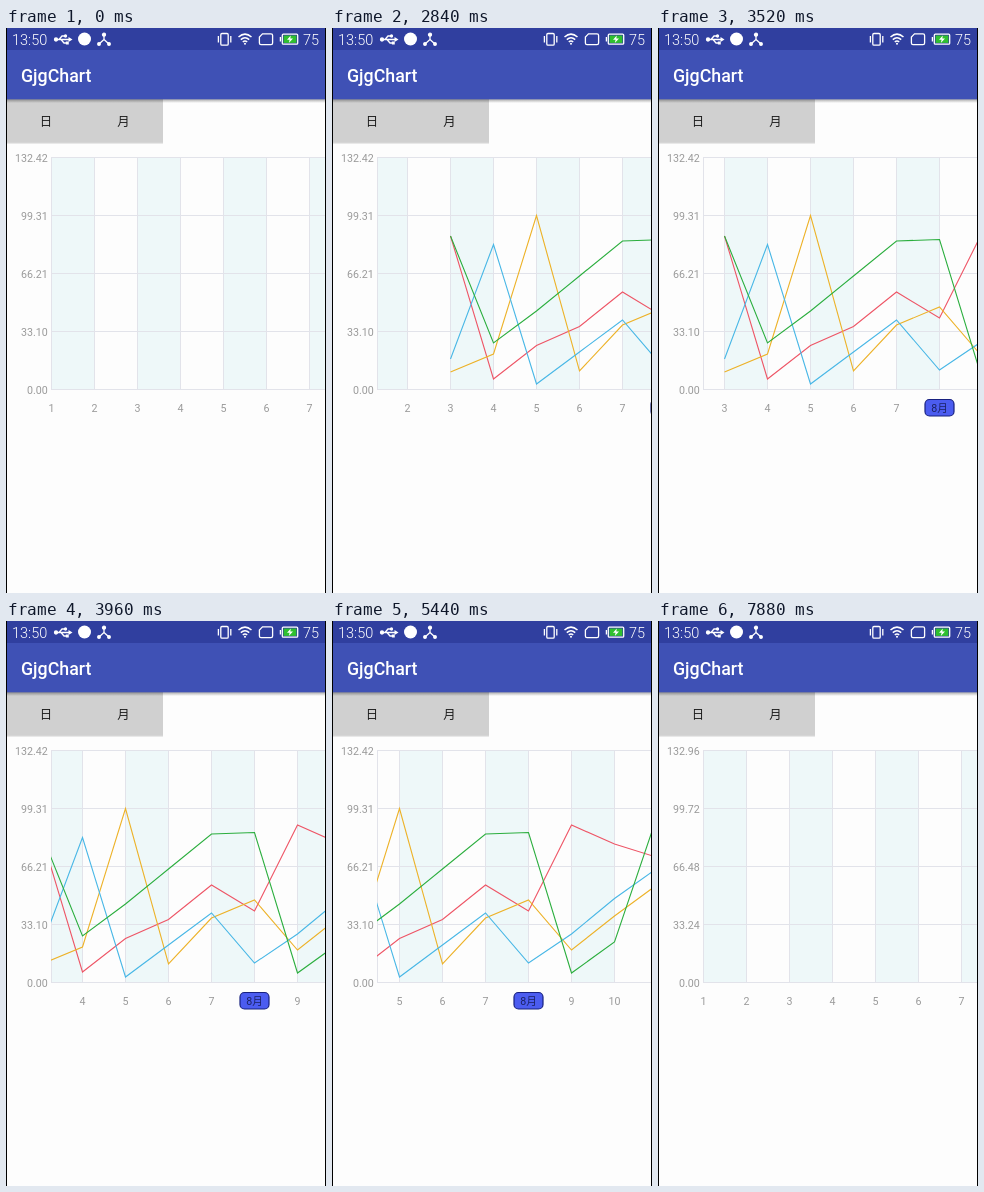
These frames come from a looping animation (320x565 px, 8 s). An HTML page:

```html
<!DOCTYPE html>
<html lang="zh-CN">
<head>
<meta charset="utf-8">
<style>
html, body { margin: 0; width: 100%; height: 100%; overflow: hidden; background: #fdfdfd; }
svg { display: block; width: 320px; height: 565px; }
text { font-family: Roboto, "Noto Sans CJK SC", "Noto Sans CJK", sans-serif; }
.status { font-size: 14.5px; font-weight: 300; fill: #fff; }
.title { font-size: 17.8px; font-weight: 500; fill: #fff; }
.btn { font-size: 12.4px; fill: #1c1c1c; text-anchor: middle; }
.axis { font-size: 10.67px; fill: #9a9a9a; }
.y { text-anchor: end; }
.x { text-anchor: middle; }
.grid { stroke: #e2e3ea; fill: none; }
.icon { stroke: #fff; fill: none; stroke-width: 1.3; }
</style>
</head>
<body>
<svg viewBox="0 0 320 565">
  <defs>
    <linearGradient id="shade" x2="0" y2="1">
      <stop offset="0" stop-color="#000" stop-opacity=".34"/>
      <stop offset="1" stop-color="#000" stop-opacity="0"/>
    </linearGradient>
    <clipPath id="plot"><rect x="45" y="120" width="275" height="250"/></clipPath>
    <clipPath id="reveal"><rect id="wipe" x="130" y="120" width="0" height="250"/></clipPath>
    <clipPath id="day"><rect x="1" y="71" width="78" height="44"/></clipPath>
  </defs>
  <rect width="320" height="565" fill="#fdfdfd"/>

  <rect x="1" y="71" width="156" height="44" fill="#d0d0d0"/>
  <path d="M1 115.3H157" stroke="#e4e4e4"/>
  <g clip-path="url(#day)"><circle id="ripple" cx="41" cy="93" r="0" fill="#000" opacity="0"/></g>
  <text class="btn" x="40" y="97.5">日</text>
  <text class="btn" x="117.5" y="97.5">月</text>

  <g clip-path="url(#plot)">
    <g id="bands"></g>
    <path class="grid" d="M45 129.5H320M45 187.5H320M45 245.5H320M45 303.5H320M45 361.5H320M45.5 129V362"/>
    <g id="series"><g id="lines" clip-path="url(#reveal)"></g></g>
  </g>
  <g id="xLabels"></g>
  <g id="yLabels"></g>

  <rect y="71" width="320" height="4" fill="url(#shade)"/>
  <rect width="320" height="22" fill="#303f9f"/>
  <rect y="22" width="320" height="49.3" fill="#3f51b5"/>
  <text class="title" x="15" y="53.5">GjgChart</text>

  <text class="status" x="6" y="17">13:50</text>
  <g class="icon">
    <path d="M49 11.5H63M53 11.5L56 8H59M55 11.5L58 15H61"/>
    <path d="M62.5 9L66.5 11.5L62.5 14Z" fill="#fff" stroke="none"/>
    <circle cx="50" cy="11.5" r="1.5" fill="#fff"/>
    <circle cx="59.5" cy="8" r="1" fill="#fff"/>
    <path d="M60.5 14.2h1.6v1.6h-1.6z" fill="#fff"/>
  </g>
  <circle cx="78.5" cy="11" r="6.5" fill="#fff"/>
  <g class="icon">
    <path d="M98 7V11.5L93 16M98 11.5L103 16"/>
    <circle cx="98" cy="6.7" r="1.5" fill="#fff"/>
    <circle cx="93" cy="16" r="1.3" fill="#fff"/>
    <circle cx="103" cy="16" r="1.3" fill="#fff"/>
  </g>
  <g class="icon">
    <rect x="214.8" y="5.5" width="7.4" height="11.6" rx="1.2"/>
    <path d="M212.4 8V14.5M224.8 8V14.5"/>
    <path d="M232.5 9Q239 3.2 245.5 9M234.8 11.6Q239 7.8 243.2 11.6M236.8 14Q239 12 241.2 14" stroke-width="1.5"/>
    <circle cx="239" cy="15.8" r="1" fill="#fff" stroke="none"/>
    <path d="M256.5 5.8H265Q266.6 5.8 266.6 7.4V15Q266.6 16.6 265 16.6H255Q253.4 16.6 253.4 15V9Z"/>
    <rect x="276.3" y="6.2" width="15.4" height="10" rx="1"/>
    <path d="M274.4 9V13.5"/>
    <rect x="277.6" y="7.5" width="12.8" height="7.4" fill="#2fc02f" stroke="none"/>
    <path d="M284.8 7.6L281 11.8H283.6L282.8 14.9L287 10.6H284.3Z" fill="#fff" stroke="none"/>
  </g>
  <text class="status" x="297" y="17">75</text>

  <path d="M.5 0V565M319.5 0V565" stroke="#000"/>
</svg>
<script>
const LOOP = 8000, TICK = 40, STEP = 43, LEFT = 45.5, FIRST = 3, MONTHS = 12;
const RESET = 7160, PRESS = 6920;
const SCALES = [
  ['132.42', '99.31', '66.21', '33.10', '0.00'],
  ['132.96', '99.72', '66.48', '33.24', '0.00']
];
// Heights of each line, one per month from FIRST on
const SERIES = {
  '#ee5566': [208, 351, 317.5, 298.5, 264, 290, 204, 223, 236.5, 202],
  '#edb228': [344, 326, 187.5, 343, 297, 279, 329, 295, 263.5, 233],
  '#48b7e6': [331, 216.5, 356, 324, 292, 342, 313, 277.5, 247, 297],
  '#2bae3e': [208, 315, 283, 248, 213, 211.5, 352, 321, 194, 346]
};
// Drag path: time, offset, speed
const DRAG = [
  [2520, 0, .01], [2840, 13, .07], [3520, 64.5, .074], [4240, 114, .04],
  [5080, 114, .05], [5920, 201, .05]
];

const $ = id => document.getElementById(id);
const colX = month => LEFT + (month - 1) * STEP;

function add(parent, tag, attrs, label) {
  const el = document.createElementNS('http://www.w3.org/2000/svg', tag);
  for (const key in attrs) el.setAttribute(key, attrs[key]);
  if (label) el.textContent = label;
  parent.appendChild(el);
  return el;
}

const labels = [];
for (let m = 1; m <= MONTHS; m++) {
  const x = colX(m);
  if (m % 2) add($('bands'), 'rect', { x, y: 129.5, width: STEP, height: 232, fill: '#eef8f9' });
  const g = add($('xLabels'), 'g', {});
  if (m === 8) {
    add(g, 'rect', { x: x - 14.5, y: 371.5, width: 29, height: 16.5, rx: 4.5, fill: '#4b5cf0', stroke: '#17207f', 'stroke-width': 1.2 });
    add(g, 'text', { class: 'axis x', x, y: 384, style: 'fill:#1b2266' }, '8月');
  } else {
    add(g, 'text', { class: 'axis x', x, y: 384 }, String(m));
  }
  labels.push(g);
}
for (let m = 1; m <= MONTHS; m++)
  add($('bands'), 'path', { class: 'grid', d: `M${colX(m)} 129V362` });

for (const color in SERIES) {
  const points = SERIES[color].map((y, i) => `${colX(FIRST + i)},${y}`).join(' ');
  add($('lines'), 'polyline', { points, stroke: color, fill: 'none', 'stroke-width': 1.1 });
}

const yLabels = SCALES[0].map((_, i) =>
  add($('yLabels'), 'text', { class: 'axis y', x: 41.7, y: 133.7 + i * 58 }));

function scrollAt(t) {
  if (t >= RESET || t <= DRAG[0][0]) return 0;
  for (let i = 1; i < DRAG.length; i++) {
    const [t0, a, va] = DRAG[i - 1], [t1, b, vb] = DRAG[i];
    if (t > t1) continue;
    if (a === b) return a;
    const d = t1 - t0, u = (t - t0) / d, w = 1 - u;
    return a * w * w * (1 + 2 * u) + b * u * u * (3 - 2 * u) + d * u * w * (va * w - vb * u);
  }
  return DRAG[DRAG.length - 1][1];
}

function draw(t) {
  const shift = Math.round(scrollAt(t));
  const move = `translate(${-shift} 0)`;
  $('bands').setAttribute('transform', move);
  $('series').setAttribute('transform', move);
  $('xLabels').setAttribute('transform', move);
  labels.forEach((g, i) => {
    g.style.display = colX(i + 1) - shift < 45 ? 'none' : '';
  });

  const fresh = t >= RESET;
  const drawn = fresh ? 0 : Math.max(0, (t - 280) * .0993);
  $('wipe').setAttribute('width', drawn ? drawn + 1.5 : 0);
  yLabels.forEach((el, i) => { el.textContent = SCALES[+fresh][i]; });

  const p = (t - PRESS) / 800;
  const on = p >= 0 && p < 1;
  $('ripple').setAttribute('r', on ? 8 + 34 * Math.min(1, p * 2) : 0);
  $('ripple').setAttribute('opacity', on ? .08 * Math.min(1, 2 - 2 * p) : 0);
}

const start = performance.now();
function frame() {
  const t = (performance.now() - start) % LOOP;
  draw(Math.floor(t / TICK) * TICK);
  requestAnimationFrame(frame);
}
draw(0);
requestAnimationFrame(frame);
</script>
</body>
</html>
```
